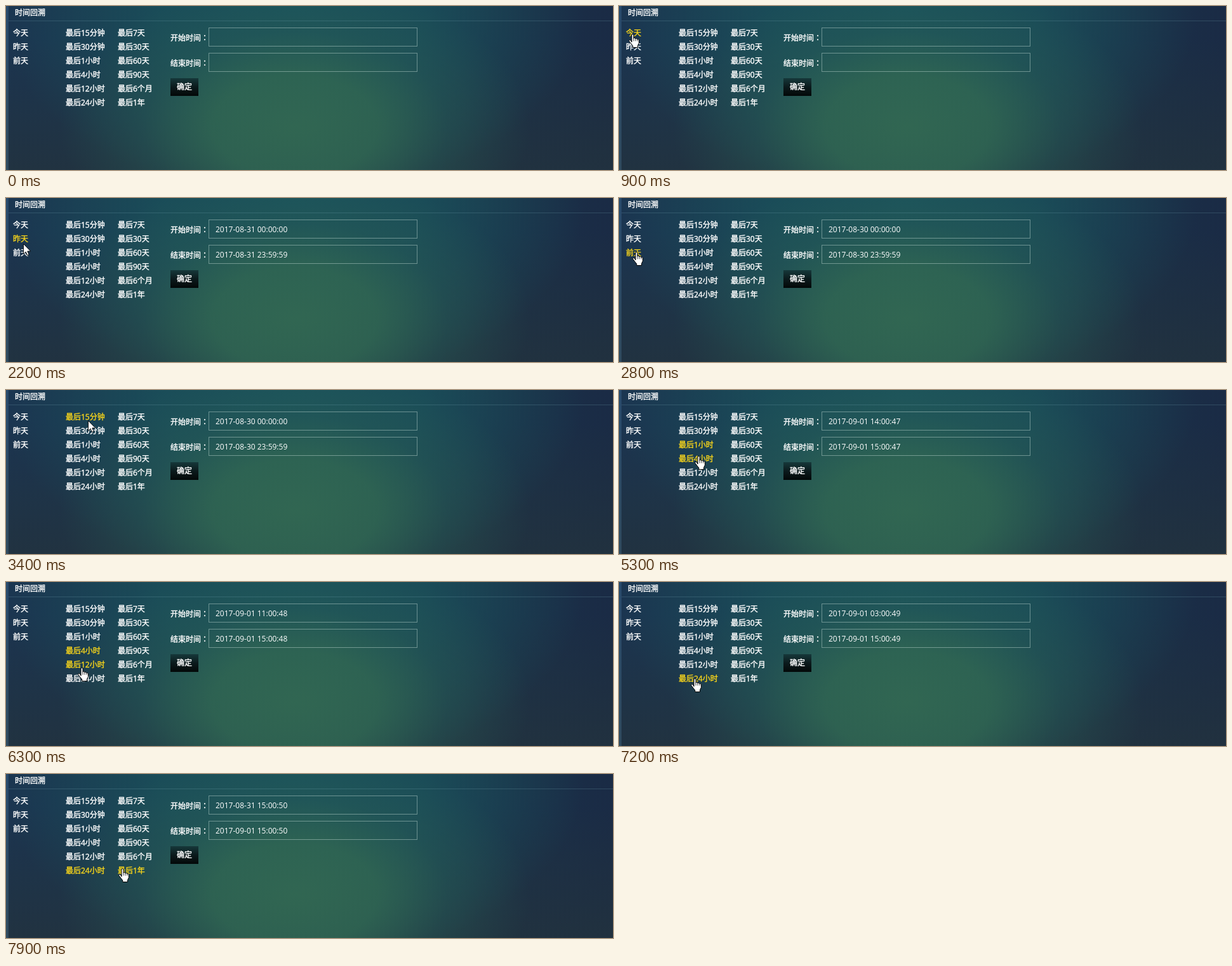
Recreate the animation shown at these times as an HTML page. Size 956 by 259 pixels, loop 8000 ms.

```html
<!DOCTYPE html>
<html lang="zh-CN">
<head>
<meta charset="utf-8">
<style>
html, body { margin: 0; width: 100%; height: 100%; overflow: hidden; }
body {
  position: relative;
  font: 12px/22px "Open Sans", "Noto Sans CJK SC", sans-serif;
  color: #fff;
  white-space: pre;
  background:
    radial-gradient(ellipse 370px 230px at 455px 190px, rgba(50,104,82,.95) 0, rgba(48,102,82,.88) 35%, rgba(40,92,84,.45) 65%, rgba(30,75,85,0) 100%),
    radial-gradient(ellipse 460px 290px at 450px 10px, #1a525c 0, rgba(26,80,90,.85) 45%, rgba(26,66,82,0) 100%),
    linear-gradient(rgba(34,50,62,0) 20%, rgba(34,50,62,.85)),
    linear-gradient(90deg, #1b3450, #1b3a50 50%, #1a2b45);
}
body > * { position: absolute; }
.strip { left: 0; top: 0; width: 4px; height: 100%; background: linear-gradient(#284a6c, #2f4a5e); }
.rule { left: 4px; right: 0; top: 23px; height: 1px; background: rgba(120,170,185,.24); }
.txt, .item { -webkit-text-stroke: .3px; text-shadow: 0 0 1px rgba(255,255,255,.4); }
.item.on { color: #f5d31c; text-shadow: 0 0 1px rgba(245,211,28,.4); }
.colon { font-family: "Noto Sans CJK TC", sans-serif; }
.field {
  left: 319px; width: 317px; height: 28px; padding-left: 10px;
  border: 1px solid rgba(190,215,210,.48); line-height: 30px;
}
.btn {
  left: 259px; top: 114px; width: 44px; height: 28px; line-height: 28px;
  text-align: center; background: linear-gradient(#16383a, #0b1a1c 50%, #030808);
}
svg { left: 0; top: 0; overflow: visible; }
</style>
</head>
<body>
<div class="strip"></div>
<div class="rule"></div>
<div class="txt" style="left:14px;top:0">时间回溯</div>
<div class="txt" style="left:259px;top:39px">开始时间<span class="colon" lang="zh-TW">：</span></div>
<div class="txt" style="left:259px;top:79px">结束时间<span class="colon" lang="zh-TW">：</span></div>
<div class="field" id="from" style="top:34px"></div>
<div class="field" id="to" style="top:74px"></div>
<div class="btn txt">确定</div>
<svg id="cursor" width="20" height="24">
  <path id="arrow" fill="#fff" stroke="#000" stroke-width=".9" d="M.5 .5V16.5L4.2 13L6.6 18.6L9.2 17.5L6.8 12H11.7Z"/>
  <g id="hand" transform="translate(-7 0)" stroke="#000" stroke-linejoin="round">
    <path fill="#fff" d="M5 13V2Q5 .5 6.5 .5T8 2V7.2Q8.3 6 9.5 6.2T11 8Q11.5 7 12.6 7.3T14 9Q14.4 8.2 15.4 8.6T16.4 10V14.5L14.5 18.5V21.5H6.8V19L3.6 15L1 11.5Q.4 10 1.7 9.6T4 11Z"/>
    <path fill="none" stroke-width=".8" d="M8 7V11.5M11 8V11.5M14 9V11.5"/>
  </g>
</svg>
<script>
const LOOP = 8000, STEP = 100, ROW = 22;
const MINUTE = 60000, DAY = 1440 * MINUTE;
const TODAY = Date.UTC(2017, 8, 1);
const CLOCK = TODAY + 15 * 60 * MINUTE + 42900; // time of day when the loop starts
const $ = id => document.getElementById(id);

const columns = [
  [11, ["今天", "昨天", "前天"]],
  [94, ["15分钟", "30分钟", "1小时", "4小时", "12小时", "24小时"].map(s => "最后" + s)],
  [176, ["7天", "30天", "60天", "90天", "6个月", "1年"].map(s => "最后" + s)]
];

const items = columns.flatMap(([x, names]) => names.map((name, row) => {
  const el = document.createElement("div");
  el.className = "item";
  el.textContent = name;
  el.style.left = x + "px";
  el.style.top = 32 + row * ROW + "px";
  document.body.insertBefore(el, $("cursor"));
  return { el, name, x, y: 42.5 + row * ROW };
}));

// Pointer moves: leave, arrive, x, y, then when the button goes down and for how long
const moves = [
  [300, 300, 876, 2],
  [300, 600, 300, 136],
  [600, 900, 22, 44, 1100],
  [1400, 1600, 27, 65, 1900],
  [2100, 2400, 28, 85, 2700],
  [2900, 3400, 129, 48, 3400, 200],
  [3500, 3800, 126, 62, 4100],
  [4200, 4600, 130, 82, 4800],
  [4900, 5300, 126, 104, 5600],
  [5800, 6300, 120, 135, 6400],
  [6700, 7000, 120, 152, 7200],
  [7400, 7900, 184, 149]
];

// Items are clicked in list order
const clicks = moves.filter(m => m[4]).map(([, , , , down, hold = 100]) => ({ down, up: down + hold }));

function pointer(t) {
  let [, , x, y] = moves[0];
  for (const [leave, arrive, toX, toY] of moves.slice(1)) {
    const k = Math.min(1, Math.max(0, (t - leave) / (arrive - leave)));
    x += (toX - x) * k;
    y += (toY - y) * k;
  }
  return [Math.round(x), Math.round(y)];
}

const stamp = ms => new Date(ms).toISOString().slice(0, 19).replace("T", " ");

function range(i) {
  if (i < 0) return ["", ""];
  if (i < columns[0][1].length) {
    const from = TODAY - i * DAY;
    return [from, from + DAY - 1000].map(stamp);
  }
  const { name } = items[i];
  const span = parseInt(name.slice(2)) * (name.includes("小时") ? 60 : 1) * MINUTE;
  const to = CLOCK + clicks[i].up;
  return [to - span, to].map(stamp);
}

function draw(now) {
  const t = Math.floor(now % LOOP / STEP) * STEP;
  const visible = t >= moves[0][0];
  const [x, y] = pointer(t);
  const hover = visible ? items.findIndex(it =>
    x >= it.x && x <= it.x + it.el.offsetWidth && Math.abs(y - it.y) < 5.5) : -1;
  const focus = clicks.filter(c => c.down <= t).length - 1;
  items.forEach((it, i) => it.el.classList.toggle("on", i === hover || i === focus));

  [$("from").textContent, $("to").textContent] = range(clicks.filter(c => c.up <= t).length - 1);

  $("cursor").style.visibility = visible ? "visible" : "hidden";
  $("cursor").style.transform = `translate(${x}px, ${y}px)`;
  $("hand").style.display = hover < 0 ? "none" : "";
  $("arrow").style.display = hover < 0 ? "" : "none";
}

const start = performance.now();
(function tick() {
  draw(performance.now() - start);
  requestAnimationFrame(tick);
})();
</script>
</body>
</html>
```
